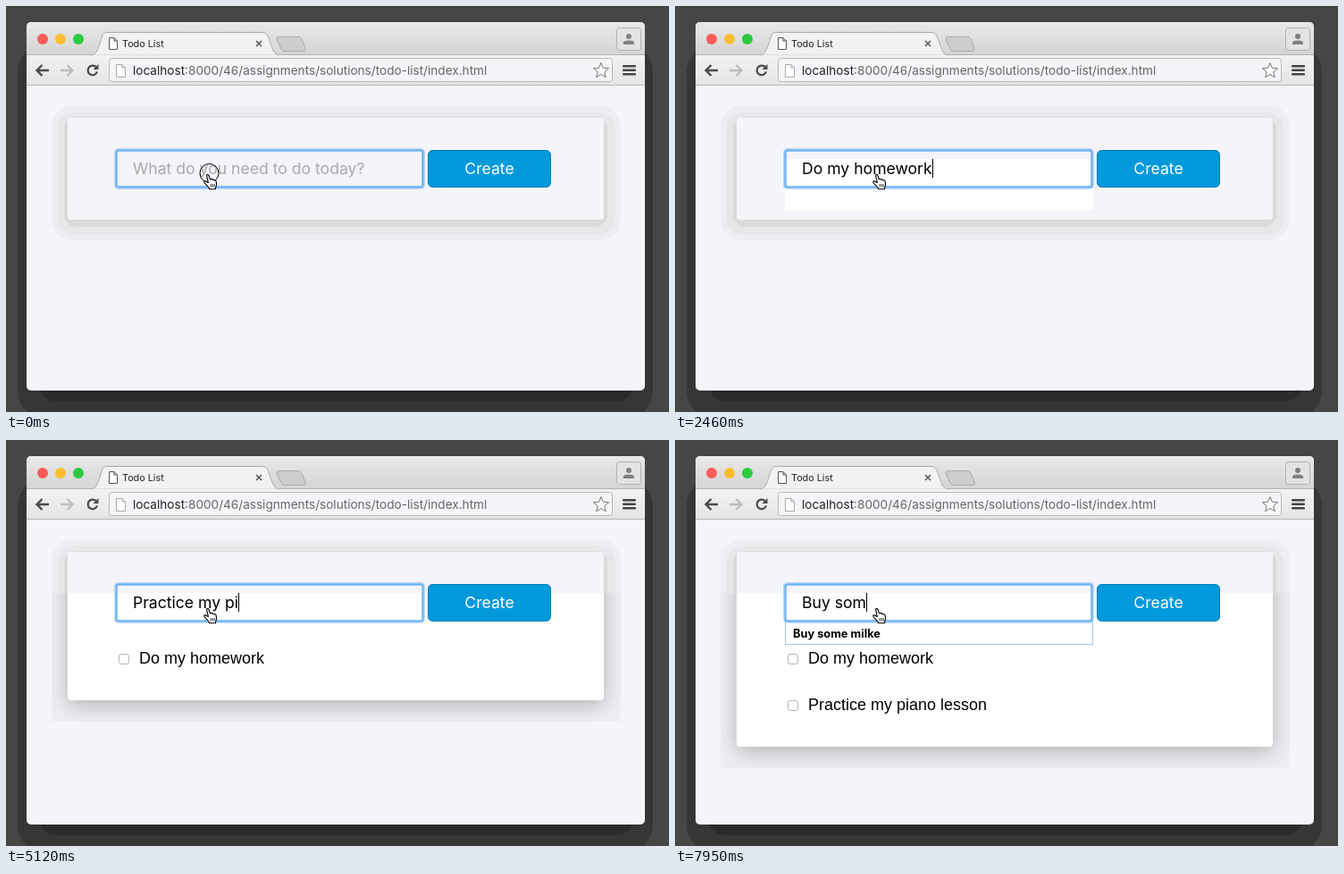
Write an HTML page with a canvas that moves like this. It is 742 px wide and 454 px high and loops after 8 s.

```html
<!DOCTYPE html>
<html lang="en">
<head>
<meta charset="utf-8">
<title>Todo List</title>
<style>
  html, body { margin: 0; width: 100%; height: 100%; overflow: hidden; background: #464646; }
  canvas { display: block; }
</style>
</head>
<body>
<canvas id="stage" width="742" height="454"></canvas>
<script>
const ctx = document.getElementById('stage').getContext('2d');
const LOOP = 8000;
const UI = 'Inter, sans-serif';
const INPUT_FONT = `17.6px ${UI}`;
const LIST_FONT = '18px "Liberation Sans", Arial, sans-serif';
const PAGE = '#f4f4f9';

// Each time is the moment one more letter shows.
const entries = [
  { text: 'Do my homework', start: 0, hint: 'Do stuff', hintFrom: 1150, hintTo: 1500,
    keys: [1060, 1230, 1410, 1500, 1590, 1670, 1760, 1850, 2020, 2110, 2190, 2370, 2460, 2460] },
  { text: 'Practice my piano lesson', start: 2720,
    keys: [3890, 3980, 4150, 4240, 4410, 4500, 4590, 4680, 4760, 4760, 4850, 4940, 5030, 5120,
      5290, 5380, 5470, 5550, 5720, 5720, 5810, 6260, 6350, 6430] },
  { text: 'Buy som', start: 6610, hint: 'Buy some milke', hintFrom: 7510, hintTo: LOOP,
    keys: [7420, 7510, 7600, 7680, 7770, 7860, 7950] }
];
const caretOff = [[0, 170], [710, 1060], [3260, 3800], [7150, 7420]];

function rect(x, y, w, h, color) {
  ctx.fillStyle = color;
  ctx.fillRect(x, y, w, h);
}

function box(x, y, w, h, r, fill, stroke, width = 1) {
  ctx.beginPath();
  ctx.roundRect(x, y, w, h, r);
  paint(fill, stroke, width);
}

function paint(fill, stroke, width = 1, path) {
  const args = path ? [path] : [];
  if (fill) { ctx.fillStyle = fill; ctx.fill(...args); }
  if (stroke) { ctx.strokeStyle = stroke; ctx.lineWidth = width; ctx.stroke(...args); }
}

const shape = (d, fill, stroke, width) => paint(fill, stroke, width, new Path2D(d));

function disc(x, y, r, fill, stroke) {
  ctx.beginPath();
  ctx.arc(x, y, r, 0, Math.PI * 2);
  paint(fill, stroke);
}

// Writes a line and returns its width.
function write(text, x, y, font, color, align = 'left') {
  ctx.font = font;
  ctx.textAlign = align;
  ctx.fillStyle = color;
  ctx.fillText(text, x, y);
  return ctx.measureText(text).width;
}

function fade(y0, y1, from, to) {
  const g = ctx.createLinearGradient(0, y0, 0, y1);
  g.addColorStop(0, from);
  g.addColorStop(1, to);
  return g;
}

function clipped(x, y, w, h, draw) {
  ctx.save();
  ctx.beginPath();
  ctx.rect(x, y, w, h);
  ctx.clip();
  draw();
  ctx.restore();
}

function drawWindow() {
  rect(0, 0, 742, 454, '#464646');
  box(13, 42, 711, 420, 32, '#363636');
  box(38, 400, 664, 42, 18, '#2b2b2b');
  box(23, 18, 692, 412, 5, PAGE);
  box(23, 18, 692, 37, [5, 5, 0, 0], fade(18, 55, '#e9e9e9', '#d4d4d4'));
  rect(23, 54, 692, 1, '#b4b4b4');
  rect(23, 55, 692, 33, fade(55, 88, '#f2f2f2', '#e5e5e5'));
  rect(23, 88, 692, 1, '#b8b8b8');
  ['#fc5b57', '#fdbd30', '#2bc940'].forEach((c, i) => disc(41 + 20 * i, 37, 6, c));

  shape('M96 55C101 54 102 50 105 42C108 33 108 29.5 113 29.5H287C292 29.5 293 33 296 42C299 50 300 54 305 55Z',
    '#f2f2f2', '#a9a9a9');
  rect(97, 54.5, 207, 1.5, '#f2f2f2');
  shape('M115.5 35.5H121L124.5 39V48.5H115.5ZM121 35.5V39H124.5', '#fff', '#555');
  write('Todo List', 130, 46, `10.8px ${UI}`, '#222');
  shape('M280 39L286 45M286 39L280 45', null, '#555', 1.5);
  shape('M305 34.5H327Q330 34.5 331 37L335 47Q336 50.5 333 50.5H312Q309 50.5 308 48L303 37Q302.500 34.500 305 34.500Z',
    '#cdcdcd', '#aaa');
  box(683.5, 24.500, 27, 25, 3, '#e3e3e3', '#b3b3b3');
  disc(697, 34, 3, '#808080');
  shape('M691 43V41Q691 38.500 697 38.500T703 41V43Z', '#808080');

  shape('M48 72H35M40.500 66L34.500 72L40.500 78', null, '#4a4a4a', 2.4);
  shape('M61 72H74M68.500 66L74.500 72L68.500 78', null, '#bdbdbd', 2.4);
  shape('M101 68.500A5.300 5.300 0 1 0 102 73.500', null, '#4a4a4a', 2.2);
  shape('M103.500 65V71H97.500Z', '#4a4a4a');
  box(115.5, 58.5, 563, 26, 3, '#f5f5f9', '#b9b9b9');
  shape('M123.500 65.500H130L133.500 69V79.500H123.500ZM130 65.500V69H133.500', '#fff', '#aaa');
  const urlFont = `13.6px ${UI}`;
  const hostWidth = write('localhost', 142, 77, urlFont, '#222');
  write(':8000/46/assignments/solutions/todo-list/index.html', 142 + hostWidth, 77, urlFont, '#666');

  ctx.beginPath();
  for (let i = 0; i < 10; i++) {
    const a = Math.PI * (i / 5 - 0.5), r = i % 2 ? 4 : 9;
    ctx.lineTo(666 + r * Math.cos(a), 72.5 + r * Math.sin(a));
  }
  ctx.closePath();
  paint('#fafafa', '#777');
  [66, 70.5, 75].forEach(y => box(690, y, 15, 2.6, 1, '#444'));
}

function drawCard(items) {
  const bands = () => {
    box(51, 111, 637, 151, 24, '#eeeef2');
    box(57, 119, 625, 137, 20, '#e7e7ea');
    box(65, 124, 608, 123, 14, '#dadadb');
  };
  if (!items) {
    bands();
    box(69, 125, 600, 114, 4, PAGE);
    return;
  }
  const bottom = 239 + 52 * items;
  clipped(51, 100, 637, 71, bands);
  clipped(51, 171, 637, bottom + 24 - 171, () => {
    rect(51, 171, 637, 400, '#efeff3');
    ctx.shadowColor = 'rgba(0,0,0,.25)';
    ctx.shadowBlur = 24;
    ctx.shadowOffsetY = 6;
    box(69, 125, 600, bottom - 125, 4, '#fff');
  });
  box(69, 125, 600, 46, [4, 4, 0, 0], PAGE);
  entries.slice(0, items).forEach((e, i) => {
    const y = 250 + 52 * i;
    box(126.5, y - 10.5, 11, 11, 2.5, '#fff', '#b4b4b4');
    write(e.text, 149, y, LIST_FONT, '#000');
  });
}

function drawForm(t, entry, items) {
  const typed = entry.text.slice(0, entry.keys.filter(k => k <= t).length);
  const hintOn = t >= entry.hintFrom && t < entry.hintTo;

  // Repainted areas stay pure white against the tinted page.
  if (items || t >= 1500) rect(124, 171, 343, 32, '#fff');
  else if (t >= 1060) rect(142, 171, 264, 21, '#fff');
  if (!items && t >= 1500) rect(123, 203, 345, 26, '#fff');

  if (hintOn) {
    box(123.5, 202.5, 344, 26, 0, '#fff', '#a5c8e6');
    write(entry.hint, 132, 221, `bold 12.8px ${UI}`, '#000');
  }
  box(123, 161, 344, 42, 3, null, 'rgba(110,180,245,.45)', 4);
  box(123.5, 161.5, 343, 41, 2, null, '#6cb2f3', 2);
  box(472.5, 161.5, 137, 41, 5, '#0099dc', '#007bb3');
  write('Create', 541, 188, INPUT_FONT, '#fff', 'center');

  const width = typed
    ? write(typed, 142, 188, INPUT_FONT, '#000')
    : (write('What do you need to do today?', 142, 188, INPUT_FONT, '#a9a9a9'), 0);
  if (!caretOff.some(([a, b]) => t >= a && t < b)) rect(Math.round(142 + width), 171, 1, 21, '#000');
}

function drawPointer(t) {
  if (t < 260) {
    ctx.globalAlpha = t < 80 ? 1 : t < 170 ? 0.5 : 0.2;
    disc(227.5, 187, 10.5, null, '#000');
    ctx.globalAlpha = 1;
  }
  ctx.save();
  ctx.translate(221, 187.5);
  ctx.lineJoin = 'round';
  shape('M3.6 2.2C3.2 .8 5.4 .4 6 2L7.4 6.4C8 5.6 9.3 5.7 9.7 6.8C10.5 6 11.7 6.4 12 7.5C13 7 14 7.6 14.2 8.8' +
    'L14.6 12C14.6 13.6 13.4 15 13.4 17.3H6.8C6.5 15.6 4.5 14 3 12.4C1.8 11 .4 9.9 .7 9C1.2 7.9 3 8.2 4.2 9.6L5.4 10Z',
    '#fff', '#000', 1.1);
  shape('M8.2 11.500V15M10.200 11.500V15M12.200 11.500V15', null, '#000', 0.8);
  ctx.restore();
}

function frame(now) {
  const t = now % LOOP;
  const items = entries.filter(e => e.start <= t).length - 1;
  drawWindow();
  drawCard(items);
  drawForm(t, entries[items], items);
  drawPointer(t);
  requestAnimationFrame(frame);
}
requestAnimationFrame(frame);
</script>
</body>
</html>
```
